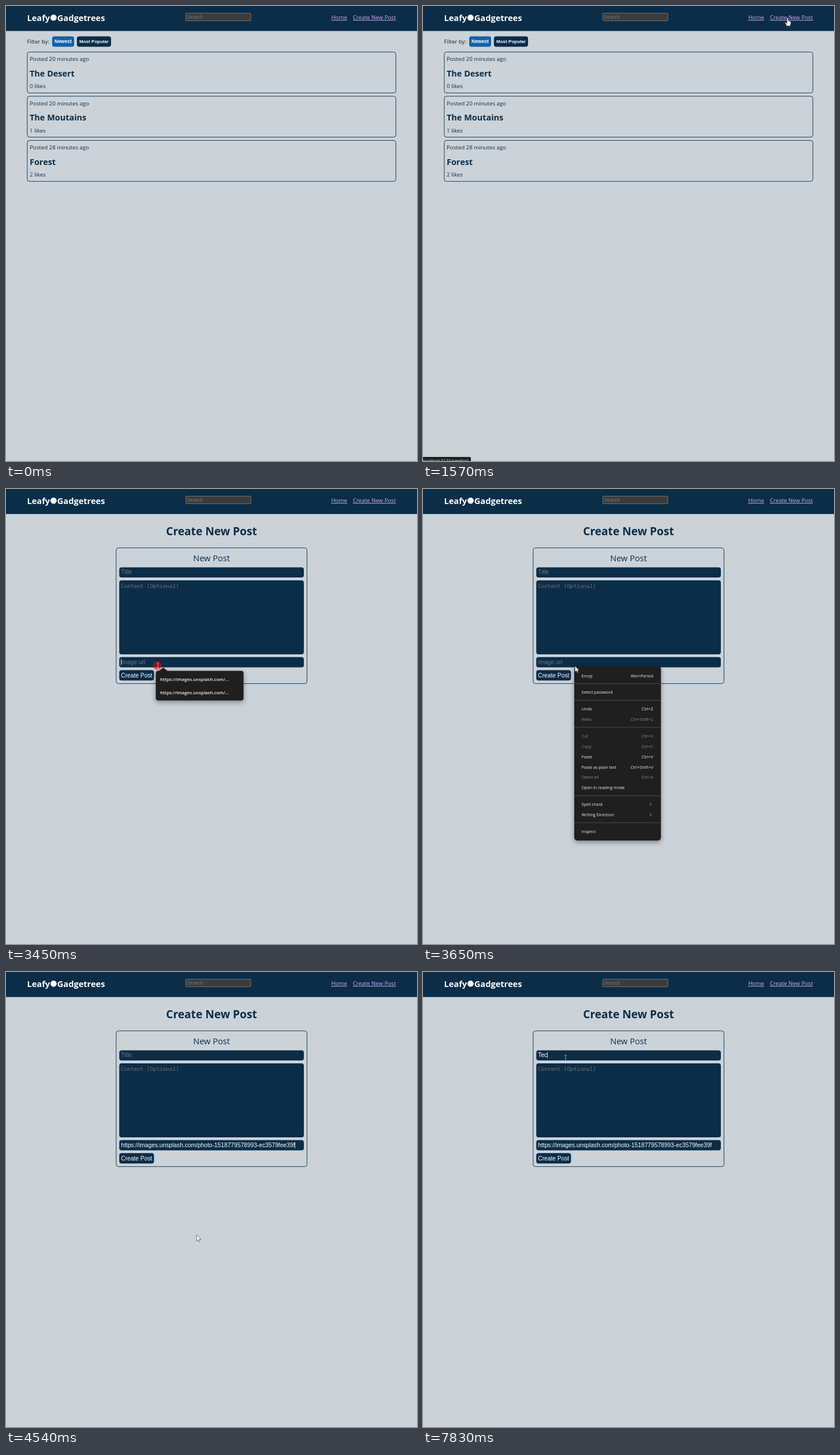
An HTML page for the animation above (8 s loop, 712x787 px).

```html
<!DOCTYPE html>
<html lang="en">
<head>
<meta charset="utf-8">
<title>Create New Post</title>
<style>
  html, body { margin: 0; width: 100%; height: 100%; overflow: hidden; background: #cbd3d9; }
  svg { display: block; width: 100vw; height: 100vh; }
  text { font: 9.7px "Open Sans", "Noto Sans", sans-serif; fill: #0b2d48; white-space: pre; }
  .navy { fill: #0b2d48; }
  .frame { fill: none; stroke: #0b2d48; stroke-width: .9; }
  .brand { font-size: 14.6px; font-weight: 700; fill: #fff; }
  .link { fill: #d0adf0; text-decoration: underline; }
  .head { font-size: 14.45px; font-weight: 700; }
  .title { font-size: 19.15px; font-weight: 700; }
  .legend { font-size: 14.55px; }
  .btn, .field, .hint { font-family: "Liberation Sans", Arial, sans-serif; }
  .btn { font-size: 8.5px; font-weight: 700; fill: #fff; }
  .field { font-size: 10.24px; fill: #fff; }
  .hint { font-size: 10.24px; fill: #757575; }
  .mono { font-family: "Noto Sans Mono", "DejaVu Sans Mono", monospace; font-size: 9.35px; }
  .tip { font-size: 7.85px; font-weight: 600; fill: #f2f2f2; }
  .item { font-size: 7.17px; fill: #f0f0f0; }
  .off { fill: #8c8c8c; }
  .end { text-anchor: end; }
  .mid { text-anchor: middle; }
  .panel { fill: #1f1f1f; }
  .shade { filter: drop-shadow(0 3px 4px rgba(0, 0, 0, .4)); }
  .rule { stroke: #5c5c5c; stroke-width: .7; }
</style>
</head>
<body>
<svg viewBox="0 0 712 787" preserveAspectRatio="none">
  <rect width="712" height="787" fill="#cbd3d9"/>
  <rect class="navy" width="712" height="43.3"/>
  <text class="brand" x="36.5" y="26">Leafy</text>
  <circle cx="82.4" cy="20.2" r="5.4" fill="#fff"/>
  <text class="brand" x="88.8" y="26">Gadgetrees</text>
  <rect x="311.4" y="12.4" width="112.8" height="13" rx="1" fill="#3b3b3b" stroke="#858585" stroke-width=".8"/>
  <text class="hint" x="313.4" y="22" style="font-size:8.8px">Search</text>
  <text class="link" x="563.4" y="23.2">Home</text>
  <text class="link" x="601" y="23.2">Create New Post</text>

  <g id="feed">
    <text x="36.6" y="65.4" style="fill:#14202c">Filter by:</text>
    <rect x="80" y="52.4" width="38" height="18" rx="4" fill="#1460a8"/>
    <text class="btn" x="84" y="64.2">Newest</text>
    <rect class="navy" x="122.8" y="52.4" width="59.2" height="18" rx="4"/>
    <text class="btn" x="127" y="64.2" style="font-size:8.05px">Most Popular</text>
  </g>

  <g id="form">
    <text class="title mid" x="356" y="80.4">Create New Post</text>
    <rect class="frame" x="190.8" y="101.8" width="330.6" height="234.8" rx="4"/>
    <text class="legend mid" x="356" y="125.4">New Post</text>
    <rect class="navy" x="196.2" y="135.4" width="319.8" height="17.6" rx="4"/>
    <rect class="navy" x="196.2" y="158" width="319.8" height="128" rx="4"/>
    <rect class="navy" x="196.2" y="290.8" width="319.8" height="17.6" rx="4"/>
    <rect class="navy" x="196.2" y="313.2" width="60.2" height="18" rx="4"/>
    <text class="hint" id="titleHint" x="199.3" y="147.4">Title</text>
    <text class="field" id="titleText" x="199.3" y="147.4"></text>
    <text class="hint mono" x="199" y="170.8">Content (Optional)</text>
    <text class="hint" id="urlHint" x="199.3" y="303.2">image url</text>
    <text class="field" id="urlText" x="199.3" y="303.2">https://images.unsplash.com/photo-1518779578993-ec3579fee39f</text>
    <text class="field" x="199.3" y="325.8">Create Post</text>
    <rect id="caret" width=".8" height="10.6" fill="#fff"/>
  </g>

  <g id="popup">
    <path class="panel shade" d="M263.5 314.5h1.5l7.3-5.6 7.3 5.6H407.5a4 4 0 0 1 4 4V361.8a4 4 0 0 1-4 4H263.5a4 4 0 0 1-4-4V318.5a4 4 0 0 1 4-4z"/>
    <text class="tip" x="267" y="331.8">https://images.unsplash.com/...</text>
    <text class="tip" x="267" y="354.8">https://images.unsplash.com/...</text>
  </g>

  <g id="menu">
    <rect class="panel shade" x="262" y="306" width="150.2" height="302" rx="5.5"/>
    <rect id="hover" x="262" y="453.8" width="150.2" height="18" fill="#363636"/>
  </g>

  <g id="status">
    <path class="panel" d="M0 780H81a2 2 0 0 1 2 2V787H0z"/>
    <text x="-.8" y="789" style="font-size:7.2px;fill:#d6d6d6">localhost:5174/newPost</text>
  </g>

  <circle id="click" r="7.6" opacity=".52"/>
  <g id="arrow"><path d="M0 0V10.6L2.5 8.3 4.1 12 5.9 11.2 4.3 7.7H7.5z" fill="#fff" stroke="#1a1a1a" stroke-width=".6"/></g>
  <g id="hand"><path d="M-1.1 1.1a1.1 1.1 0 0 1 2.2 0V5.3l3.7.9q1.3.4 1.2 1.8L5.4 11.6 4.6 14.4H-1.1L-4 9.6q-.6-1.2.5-1.5.8-.1 1.4.7l1 1.1z" fill="#fff" stroke="#1a1a1a" stroke-width=".6"/></g>
  <g id="beam"><path d="M-2.1-5.2H-.6L0-4.7.6-5.2H2.1M0-4.7V4.7M-2.1 5.2H-.6L0 4.7.6 5.2H2.1" fill="none" stroke="#b9c1c8" stroke-width=".8"/></g>
</svg>
<script>
const LOOP = 8000, PAGE = 1640, FOCUS = 3055, POPUP = 3190, MENU = 3580, CLOSE = 4345, PASTE = 4470, TITLE = 5510;
const $ = id => document.getElementById(id);
const show = (id, on) => { $(id).style.display = on ? '' : 'none'; };

function add(parent, tag, attrs, text = '') {
  const node = document.createElementNS('http://www.w3.org/2000/svg', tag);
  for (const k in attrs) node.setAttribute(k, attrs[k]);
  node.textContent = text;
  $(parent).append(node);
}

[['20', 'The Desert', 0], ['20', 'The Moutains', 1], ['28', 'Forest', 2]].forEach(([age, name, likes], i) => {
  const y = 79.6 + i * 76.45;
  add('feed', 'rect', { class: 'frame', x: 36.8, y, width: 638.6, height: 70.8, rx: 4 });
  add('feed', 'text', { x: 41, y: y + 15.7 }, `Posted ${age} minutes ago`);
  add('feed', 'text', { class: 'head', x: 41, y: y + 42.2 }, name);
  add('feed', 'text', { x: 41, y: y + 62.5 }, `${likes} likes`);
});

// label, shortcut, disabled; null is a separator
const items = [
  ['Emoji', 'Win+Period'], null, ['Select password'], null,
  ['Undo', 'Ctrl+Z'], ['Redo', 'Ctrl+Shift+Z', 1], null,
  ['Cut', 'Ctrl+X', 1], ['Copy', 'Ctrl+C', 1], ['Paste', 'Ctrl+V'],
  ['Paste as plain text', 'Ctrl+Shift+V'], ['Select all', 'Ctrl+A', 1], ['Open in reading mode'], null,
  ['Spell check', '>'], ['Writing Direction', '>'], null, ['Inspect']
];
let row = 314;
for (const item of items) {
  if (!item) {
    add('menu', 'line', { class: 'rule', x1: 262, x2: 412.2, y1: row + 4.9, y2: row + 4.9 });
    row += 10.8;
    continue;
  }
  const [label, keys, off] = item, y = row + 11.6, cls = off ? 'item off' : 'item';
  add('menu', 'text', { class: cls, x: 274.8, y }, label);
  if (keys === '>') {
    add('menu', 'path', { d: `M393 ${row + 6.4}l2.5 2.5-2.5 2.5`, fill: 'none', stroke: '#d0d0d0', 'stroke-width': .8 });
  } else if (keys) {
    add('menu', 'text', { class: cls + ' end', x: 398.8, y }, keys);
  }
  row += 17.93;
}

// start, end and number of steps of each pointer move
const moves = [[130, 890, 12], [960, 1230, 4], [1500, 2240, 12], [2520, 3190, 11],
  [3450, 4200, 11], [4270, 5030, 11], [5100, 5310, 4]];
// time, x, y
const path = [
  [130, 664, 778], [270, 660, 690], [480, 632, 405], [620, 627, 220], [890, 631, 38],
  [960, 631, 30], [1100, 631, 11], [1230, 631.5, 20.3],
  [1640, 631.5, 20.3], [1850, 520, 110], [1980, 390, 182], [2120, 316.5, 183.6], [2240, 292, 149.4],
  [2520, 290, 158], [2655, 281, 202], [2790, 277, 245], [2990, 263.2, 306],
  [3600, 263.2, 306], [3800, 305, 385], [3990, 329, 444], [4200, 332, 460],
  [4490, 332, 460], [4640, 300, 362], [4750, 272, 275], [4830, 267, 238], [5030, 247, 167.5],
  [5100, 247, 162], [5310, 247, 149.2]
];
// time, length, radius colour
const clicks = [[1500, 70, '#ff0'], [FOCUS, 70, '#ff0'], [3450, 130, '#f00'], [4270, 75, '#ff0'], [TITLE, 130, '#ff0']];

function stepTime(t) {
  let held = 0;
  for (const [a, b, n] of moves) {
    if (t < a) break;
    const gap = (b - a) / (n - 1);
    held = t >= b ? b : a + Math.floor((t - a) / gap + .01) * gap;
  }
  return held;
}

function pointer(t) {
  const i = path.findIndex(p => p[0] > t);
  if (i < 0) return path[path.length - 1].slice(1);
  if (i === 0) return path[0].slice(1);
  const [a, ax, ay] = path[i - 1], [b, bx, by] = path[i], k = (t - a) / (b - a);
  return [ax + (bx - ax) * k, ay + (by - ay) * k];
}

function cursorKind(t, x, y) {
  if (t < 130) return '';
  if (t < PAGE) return y < 28 ? 'hand' : 'arrow';
  if (t >= MENU && t < CLOSE) return 'arrow';
  const inside = (a, b) => y > a && y < b;
  const field = inside(135, 153) || inside(158, 286) || inside(291, 308.5);
  if (field && x > 196 && x < 516) return 'beam';
  return y < 26 && x > 601 ? 'hand' : 'arrow';
}

function caretAt(t) {
  const blink = since => Math.floor((t - since) / 530) % 2 === 0;
  const end = id => 199.3 + $(id).getComputedTextLength();
  if (t >= 7370) return [end('titleText'), 138.4];
  if (t >= TITLE) return blink(TITLE) && [199.2, 138.8];
  if (t >= PASTE) return t < PASTE + 530 && [end('urlText'), 294.2];
  return t >= FOCUS && t < MENU && [199.2, 294.2];
}

const ramp = (t, a, b) => Math.min(1, Math.max(0, (t - a) / (b - a)));

function draw(t) {
  show('feed', t < PAGE);
  show('form', t >= PAGE);
  show('popup', t >= POPUP && t < MENU);
  show('menu', t >= MENU && t < CLOSE);
  show('hover', t >= 4120);
  show('urlHint', t < PASTE);
  show('urlText', t >= PASTE);
  $('status').style.opacity = ramp(t, 1030, 1230) - ramp(t, 2070, 2240);

  $('titleText').textContent = 'Tec'.slice(0, [7370, 7570, 7830].filter(s => t >= s).length);
  show('titleHint', t < 7370);

  const caret = t >= PAGE && caretAt(t);
  show('caret', caret);
  if (caret) {
    $('caret').setAttribute('x', caret[0]);
    $('caret').setAttribute('y', caret[1]);
  }

  const [x, y] = pointer(stepTime(t)), kind = cursorKind(t, x, y);
  for (const id of ['arrow', 'hand', 'beam']) show(id, id === kind);
  if (kind) $(kind).setAttribute('transform', `translate(${x} ${y})`);

  const click = clicks.find(c => t >= c[0] && t < c[0] + c[1]);
  show('click', click);
  if (click) {
    $('click').setAttribute('fill', click[2]);
    $('click').setAttribute('cx', x - 1.2);
    $('click').setAttribute('cy', y - .6);
  }
}

const start = performance.now();
function tick() {
  draw((performance.now() - start) % LOOP);
  requestAnimationFrame(tick);
}
tick();
</script>
</body>
</html>
```
